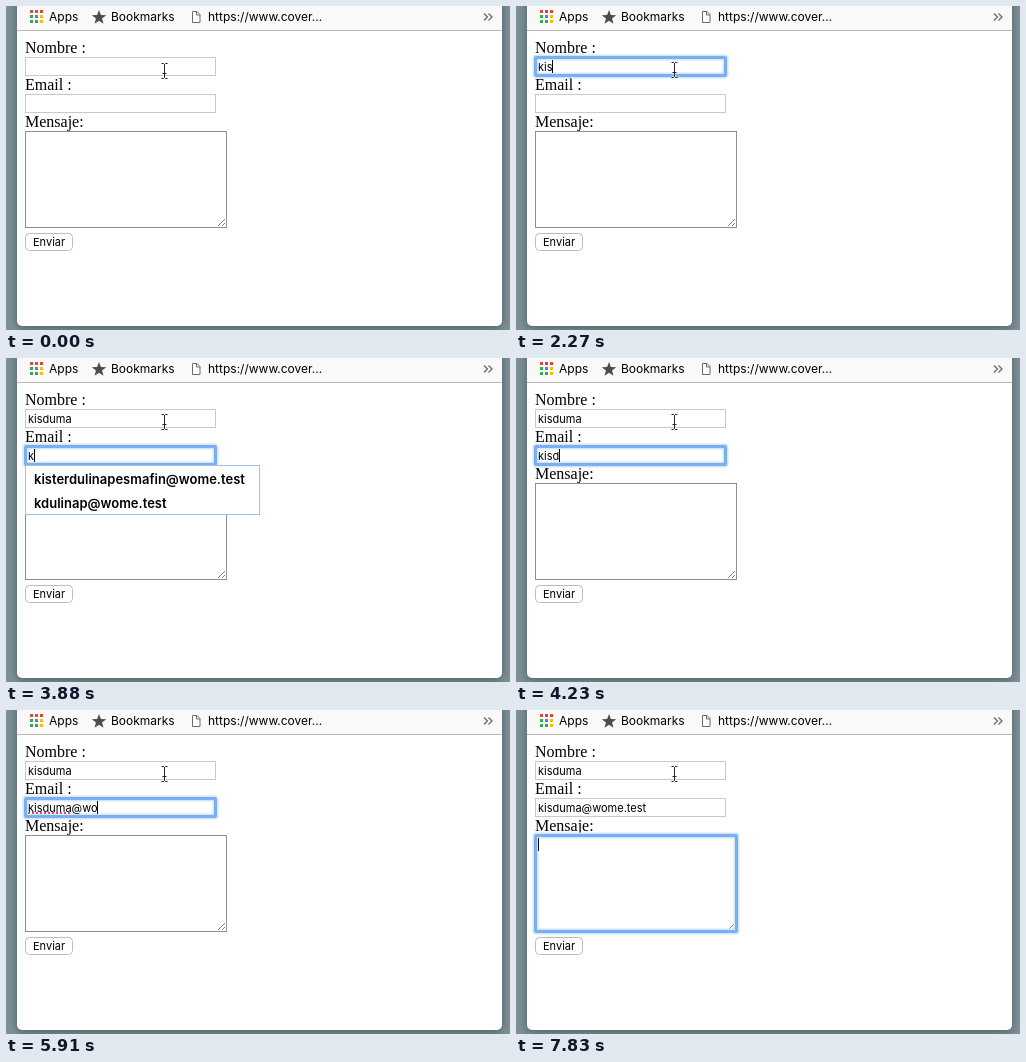
These frames come from a looping animation (504x324 px, 8000 ms). An HTML page:

```html
<!DOCTYPE html>
<html lang="es">
<head>
<meta charset="utf-8">
<title>Formulario</title>
<style>
  html, body { margin: 0; width: 100%; height: 100%; overflow: hidden; background: #7c9097; }
  svg { display: block; }
  text { font-family: Inter, "Open Sans", sans-serif; font-size: 11px; fill: #000; }
  .bar text { font-size: 12px; }
  .labels text { font-family: "Liberation Serif", serif; font-size: 16px; }
  .list text { font-size: 13px; font-weight: 600; }
  .window { filter: drop-shadow(0 2px 5px rgba(0, 0, 0, .35)); }
  .box { fill: #fff; stroke: #c9c9c9; }
  .ring rect { fill: none; }
  .squiggle { stroke: #e8505b; stroke-width: 2; stroke-dasharray: 2 2; fill: none; }
</style>
</head>
<body>
<svg width="504" height="324" viewBox="0 0 504 324">
  <path class="window" d="M11 -20H496V315a5 5 0 0 1 -5 5H16a5 5 0 0 1 -5 -5Z" fill="#fff"/>

  <g class="bar">
    <path d="M11 0H496V24H11Z" fill="#f9f9f9"/>
    <path d="M11 24.5H496" stroke="#b8b8b8"/>
    <g id="apps"></g>
    <text x="43" y="15">Apps</text>
    <path id="star" fill="#494d54"/>
    <text x="105" y="15">Bookmarks</text>
    <path d="M186.500 5.500h4.500l3 3v8h-7.500ZM190.500 5.500v3.500h3.500" fill="#fff" stroke="#6b6b6b"/>
    <text x="202" y="15">https://www.cover...</text>
    <path d="M478 7.500l3.500 3.500l-3.500 3.500M482.500 7.500l3.500 3.500l-3.500 3.500" fill="none" stroke="#6a6a6a" stroke-width="1.300"/>
  </g>

  <g class="labels">
    <text x="19" y="47">Nombre :</text>
    <text x="19" y="84">Email :</text>
    <text x="19" y="121">Mensaje:</text>
  </g>

  <rect class="box" x="19.5" y="51.5" width="190" height="18"/>
  <rect class="box" x="19.5" y="88.5" width="190" height="18"/>
  <rect class="box" x="19.5" y="125.5" width="201" height="96" style="stroke:#8f8f8f"/>
  <path d="M212 220l7 -7M216 220l3 -3" stroke="#777" stroke-width=".9"/>
  <rect class="box" x="19.5" y="227.5" width="47" height="17" rx="4" style="stroke:#bdbdbd"/>
  <text x="27" y="240">Enviar</text>

  <g id="ring" class="ring">
    <rect stroke="#d3e5fb" stroke-width="6"/>
    <rect stroke="#79b0f2" stroke-width="3"/>
  </g>

  <text id="name" x="22" y="65"></text>
  <text id="email" x="22" y="102"></text>
  <path id="squiggle" class="squiggle"/>
  <rect id="caret" width="1" height="13"/>

  <g id="list" class="list">
    <rect id="listBox" x="19.5" y="107.5" width="234" fill="#fff" stroke="#a3c1e2"/>
    <text x="28" y="126">kisterdulinapesmafin@wome.test</text>
    <text id="second" x="28" y="150">kdulinap@wome.test</text>
  </g>

  <g id="pointer" fill="none">
    <path d="M155.500 56.500h2l1 1l1 -1h2M158.500 57.500v13M155.500 71.500h2l1 -1l1 1h2M156.500 66.500h4" stroke="#fff" stroke-width="2" opacity=".7"/>
    <path d="M155.500 56.500h2l1 1l1 -1h2M158.500 57.500v13M155.500 71.500h2l1 -1l1 1h2M156.500 66.500h4" stroke="#222"/>
  </g>
</svg>
<script>
const LOOP = 8000;
const USER = "kisduma", EMAIL = USER + "@wome.test";
const el = id => document.getElementById(id);
const show = (node, on) => node.setAttribute("visibility", on ? "visible" : "hidden");
const setAll = (node, attrs) => Object.entries(attrs).forEach(([k, v]) => node.setAttribute(k, v));

// Focusable fields: ring rectangle and caret top
const fields = [
  { width: 190, height: 18, y: 51.5, caretY: 54 },
  { width: 190, height: 18, y: 88.5, caretY: 91 },
  { width: 201, height: 96, y: 125.5, caretY: 128 }
];

// Each step changes some of the state from its time on
const start = { dy: 1, focus: -1, name: 0, email: 0, caret: true, rows: 0, marks: 0 };
const steps = [
  [290, { dy: 0 }],
  [650, { focus: 0 }],
  [1130, { caret: false }],
  [1430, { name: 1, caret: true }],
  [1910, { name: 2 }],
  [2270, { name: 3 }],
  [2450, { name: 4 }],
  [2680, { name: 5 }],
  [2740, { name: 6 }],
  [2800, { name: 7 }],
  [3100, { focus: 1 }],
  [3580, { caret: false }],
  [3880, { email: 1, caret: true, rows: 2 }],
  [4050, { email: 2, rows: 1 }],
  [4140, { email: 3 }],
  [4230, { email: 4, rows: 0 }],
  [4410, { email: 5 }],
  [4470, { email: 7 }],
  [5010, { email: 8 }],
  [5070, { marks: 1 }],
  [5490, { caret: false }],
  [5850, { email: 9, caret: true }],
  [5910, { email: 10 }],
  [6030, { email: 11 }],
  [6090, { email: 12 }],
  [6270, { email: 13, marks: 2 }],
  [6390, { email: 14 }],
  [6450, { email: 15 }],
  [6570, { email: 16 }],
  [6690, { email: 17 }],
  [6810, { focus: 2, marks: 0 }],
  [7290, { caret: false }],
  [7830, { caret: true }]
];

function stateAt(time) {
  const state = { ...start };
  for (const [at, change] of steps) if (time >= at) Object.assign(state, change);
  return state;
}

const endOf = (node, count) =>
  Math.floor(22 + (count ? node.getSubStringLength(0, count) : 0));

function draw(s) {
  el("pointer").setAttribute("transform", `translate(0 ${s.dy})`);
  el("name").textContent = USER.slice(0, s.name);
  el("email").textContent = EMAIL.slice(0, s.email);

  const field = fields[s.focus];
  show(el("ring"), field);
  show(el("caret"), field && s.caret);
  if (field) {
    const { width, height, y, caretY } = field;
    for (const rect of el("ring").children) setAll(rect, { x: 19.5, y, width, height, rx: 1 });
    const x = [endOf(el("name"), s.name), endOf(el("email"), s.email), 22][s.focus];
    setAll(el("caret"), { x, y: caretY });
  }

  let marks = "";
  if (s.marks > 0) marks += `M22 103H${endOf(el("email"), 7)}`;
  if (s.marks > 1) marks += `M${endOf(el("email"), 8)} 103H${endOf(el("email"), 12)}`;
  el("squiggle").setAttribute("d", marks);

  show(el("list"), s.rows);
  show(el("second"), s.rows > 1);
  el("listBox").setAttribute("height", 1 + 24 * s.rows);
}

const [R, G, B, Y] = ["#ea4335", "#34a853", "#4285f4", "#fbbc05"];
el("apps").innerHTML = [R, R, R, G, B, Y, G, G, Y].map((fill, i) =>
  `<rect x="${24 + i % 3 * 5}" y="${4 + Math.floor(i / 3) * 5}" width="3" height="3" fill="${fill}"/>`).join("");

el("star").setAttribute("d", "M" + Array.from({ length: 10 }, (_, i) => {
  const r = i % 2 ? 3.2 : 7.6, a = i * Math.PI / 5;
  return `${(93 + r * Math.sin(a)).toFixed(2)} ${(11.500 - r * Math.cos(a)).toFixed(2)}`;
}).join("L") + "Z");

const origin = performance.now();
function tick() {
  draw(stateAt((performance.now() - origin) % LOOP));
  requestAnimationFrame(tick);
}
tick();
</script>
</body>
</html>
```
